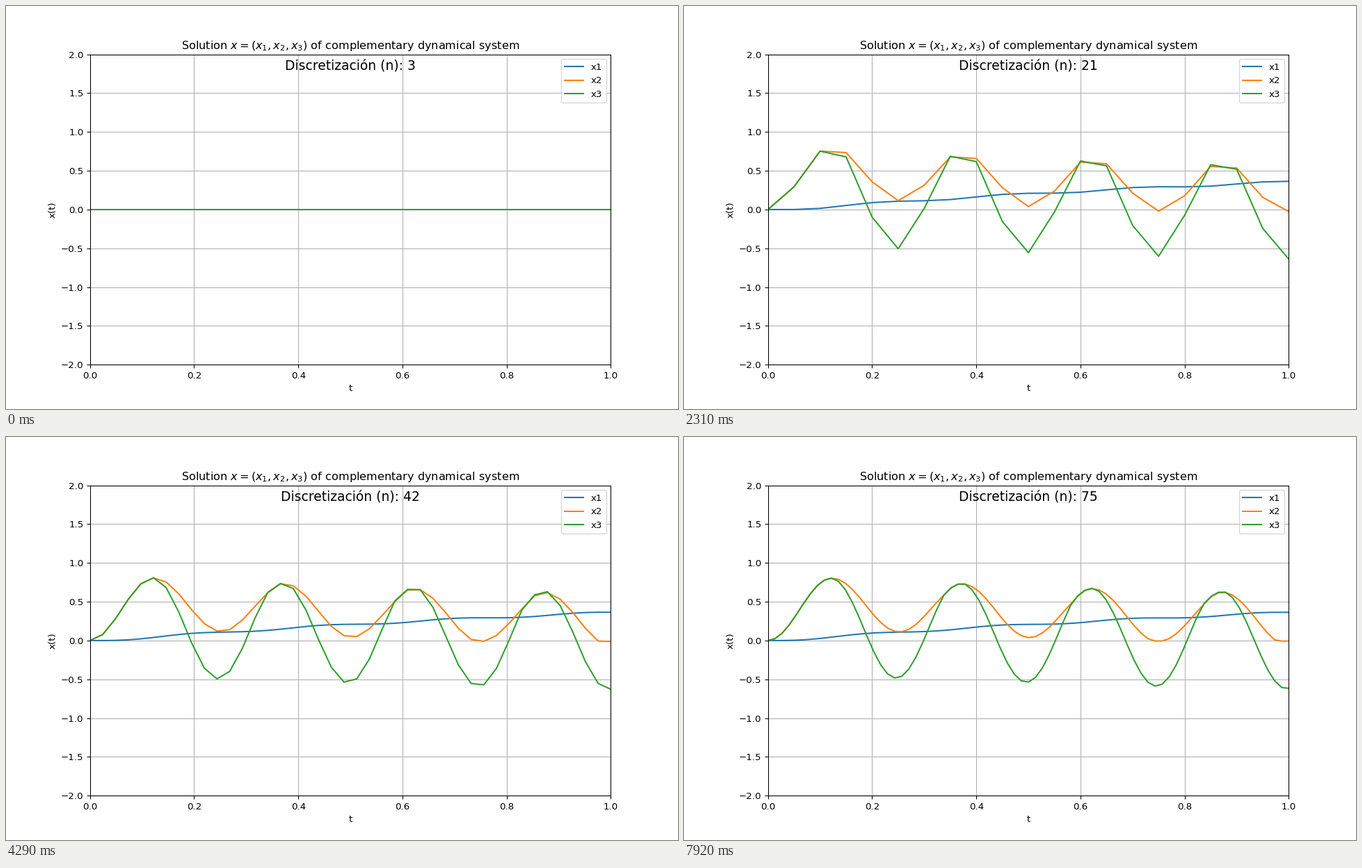
A matplotlib script that plays this animation: 966 px wide and 580 px high, repeating every 8000 ms.

```python
import numpy as np
import matplotlib.pyplot as plt
from matplotlib.animation import FuncAnimation

W, H, DPI = 966, 580, 96.6
EPS = 1e-6                         # guards the pixel size against rounding down
LOOP, TICK, HOLD = 8000, 40, 330   # ms
OMEGA = 8 * np.pi


def solve(n):
    """Time stepping of the circuit x' = A x + B lam + u on n grid points."""
    t = np.linspace(0, 1, n)
    h = t[1]
    pulse = -np.diff(np.cos(OMEGA * t)) / OMEGA   # integral of sin per step
    x = np.zeros((n, 3))
    for k, p in enumerate(pulse):
        a, b, c = x[k]
        na = a + h * b
        nb = b + 8 * p + h * (-0.5 * a - b + 0.5 * c)
        nc = c + 16 * p + h * (b - 3 * c)
        slack = 1.5 * h * a
        # first diode keeps x3 below x2, second keeps x2 from going negative
        push = max(0, (nc - nb - slack) / 1.5)
        nb += 0.5 * push
        nc -= push
        nb = max(nb, -slack)
        x[k + 1] = na, nb, nc
    return t, x


fig, ax = plt.subplots(figsize=((W + EPS) / DPI, (H + EPS) / DPI), dpi=DPI)
lines = [ax.plot([], [], label=f"x{i}")[0] for i in (1, 2, 3)]
ax.set_xlim(0, 1)
ax.set_ylim(-2, 2)
ax.set_xlabel("t")
ax.set_ylabel("x(t)")
ax.set_title("Solution $x=(x_1,x_2,x_3)$ of complementary dynamical system")
ax.grid(True)
ax.legend(loc="upper right")
label = ax.text(0.5, 0.95, "", transform=ax.transAxes, ha="center", fontsize=14)


def update(i):
    n = 3 + 3 * int((i + 0.5) * TICK // HOLD)
    t, x = solve(n)
    for line, values in zip(lines, x.T):
        line.set_data(t, values)
    label.set_text(f"Discretización (n): {n}")
    return [*lines, label]


anim = FuncAnimation(fig, update, frames=LOOP // TICK, interval=TICK,
                     init_func=lambda: update(0), repeat=True, repeat_delay=0)
plt.show()
```
